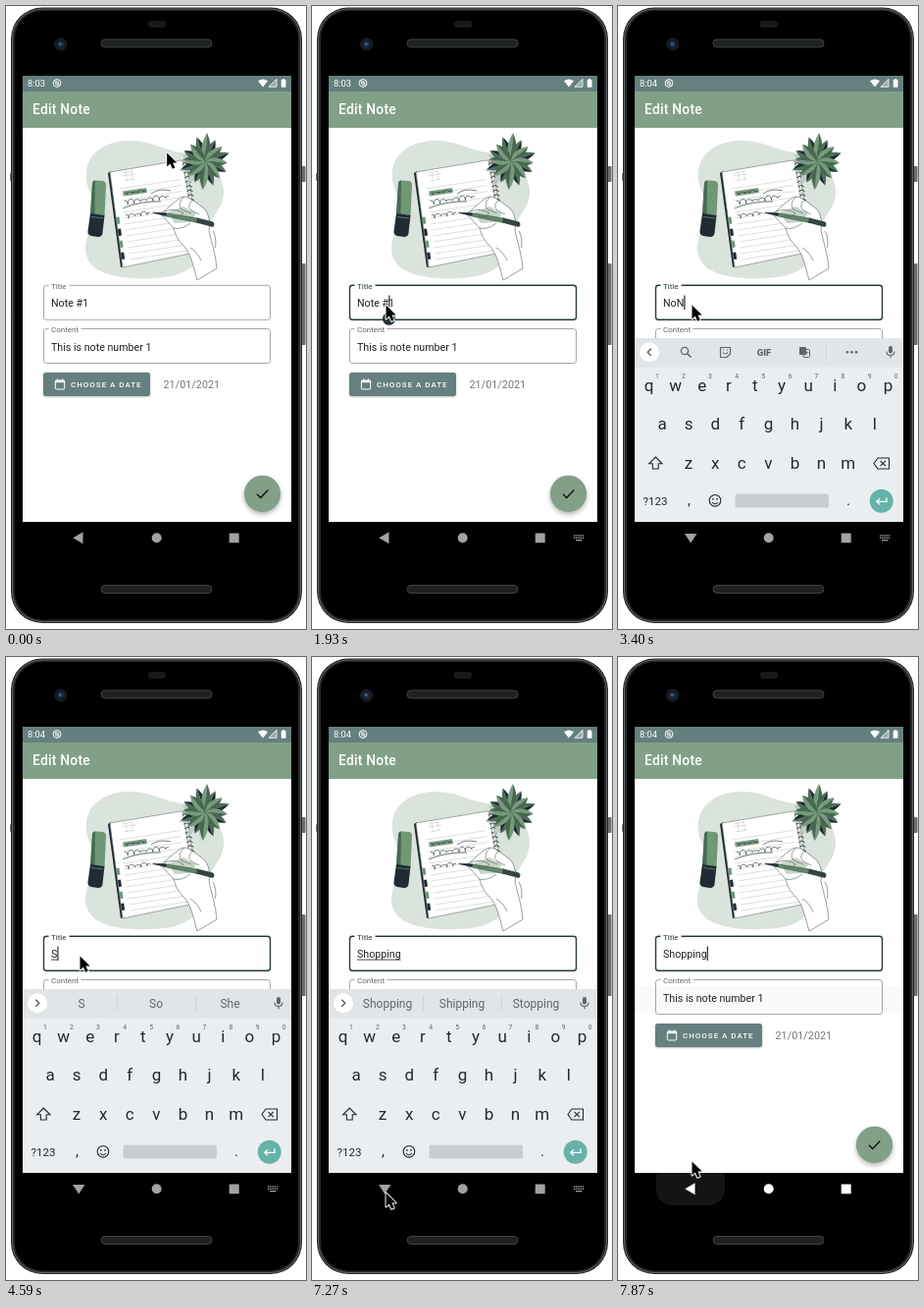
Animation, 306 px wide and 634 px high, one loop 8 s. Source, as an HTML page with a canvas:

```html
<!DOCTYPE html>
<html lang="en">
<head>
<meta charset="utf-8">
<title>Edit Note</title>
<style>
html, body { margin: 0; width: 306px; height: 634px; overflow: hidden; background: #fff; }
canvas { display: block; width: 306px; height: 634px; }
</style>
</head>
<body>
<canvas id="stage"></canvas>
<script>
const W = 306, H = 634, LOOP = 8000, TAU = Math.PI * 2;
const SAGE = '#82a087', TEAL = '#667f7f', INK = '#202c33', KEY = '#202a30', GREY = '#5f666b';
const canvas = document.getElementById('stage');
const ctx = canvas.getContext('2d');
const dpr = window.devicePixelRatio || 1;
canvas.width = W * dpr;
canvas.height = H * dpr;

// [start, value]: each value holds until the next start
const TEXT = [[0, 'Note #1'], [2960, 'Note #'], [3110, 'Note'], [3250, 'No'], [3400, 'NoN'],
  [3550, 'No'], [3700, 'N'], [4140, ''], [4590, 'S'], [4740, 'Sh'], [4890, 'Sho'],
  [5040, 'Shop'], [5340, 'Shoppi'], [5480, 'Shoppin'], [5780, 'Shopping']];
const CARET = [[0, false], [1180, true], [2230, false], [2670, true], [3840, false], [3990, true],
  [6230, false], [6680, true], [7270, false], [7720, true]];
const POINTER = [[0, [163.7, 149]], [150, [160, 163]], [300, [134, 222]], [450, [102, 288]],
  [600, [79, 316]], [740, [75, 304]], [6680, [75, 322]], [6830, [73, 410]], [6980, [68, 520]],
  [7120, [70, 578]], [7270, [75, 545]], [7720, [75, 530]], [7870, [75, 513]]];
const BOARD = [[0, 0], [2080, 0.6], [2230, 1], [7720, 0.45], [7870, 0]];
const WORDS = [[0, null], [4590, ['S', 'So', 'She']], [4740, ['Sh', 'She', 'Show']],
  [4890, ['Sho', 'Show', 'Shot']], [5040, ['Shop', 'Shops', 'Show']],
  [5340, ['Shoppi', '*Shopping', 'Shoppings']], [5480, ['Shoppin', '*Shopping', 'Shoppings']],
  [5780, ['Shopping', 'Shipping', 'Stopping']]];

function at(track, t) {
  let v = track[0][1];
  for (const [start, value] of track) if (t >= start) v = value;
  return v;
}

function rect(x, y, w, h, color) {
  ctx.fillStyle = color;
  ctx.fillRect(x, y, w, h);
}

function round(x, y, w, h, r, fill, stroke, lw = 1) {
  ctx.beginPath();
  ctx.roundRect(x, y, w, h, r);
  paint(fill, stroke, lw);
}

function disc(x, y, r, fill, stroke, lw = 1) {
  ctx.beginPath();
  ctx.arc(x, y, r, 0, TAU);
  paint(fill, stroke, lw);
}

function shape(d, fill, stroke, lw = 1) {
  const p = new Path2D(d);
  if (fill) { ctx.fillStyle = fill; ctx.fill(p); }
  if (stroke) { ctx.strokeStyle = stroke; ctx.lineWidth = lw; ctx.stroke(p); }
}

function paint(fill, stroke, lw) {
  if (fill) { ctx.fillStyle = fill; ctx.fill(); }
  if (stroke) { ctx.strokeStyle = stroke; ctx.lineWidth = lw; ctx.stroke(); }
}

function label(s, x, y, size, color, { weight = 400, align = 'left', gap = 0 } = {}) {
  ctx.font = `${weight} ${size}px Roboto, sans-serif`;
  ctx.textAlign = align;
  ctx.letterSpacing = gap + 'px';
  ctx.fillStyle = color;
  ctx.fillText(s, x, y);
  const w = ctx.measureText(s).width;
  ctx.letterSpacing = '0px';
  return w;
}

function shadow(blur, dy) {
  ctx.shadowColor = 'rgba(0,0,0,.3)';
  ctx.shadowBlur = blur * dpr;
  ctx.shadowOffsetY = dy * dpr;
}

function noShadow() {
  ctx.shadowColor = 'transparent';
}

function phone() {
  rect(0, 0, W, H, '#fff');
  round(300, 163, 5.5, 16, 1, '#6b6e70');
  round(300, 262, 5.5, 83, 1, '#6b6e70');
  round(4, 170, 2, 8, 1, '#777');
  round(5, 1.5, 297, 626.5, 32, '#252728');
  round(6.5, 3, 294, 623.5, 30.5, null, '#5d6163', 1);
  round(9, 5, 289, 619.5, 28, '#000');
  round(145, 15, 18, 7, 3, '#17191a');
  for (const y of [34, 589.5]) round(97, y, 113, 8, 4, '#1f2122', '#3f4244', 1);
  disc(55.7, 39, 6, '#15191d', '#212427');
  disc(55.7, 39, 3.3, '#1a2c48');
  disc(55.2, 38.5, 1.5, '#3d5f92');
}

function statusBar(t) {
  rect(17, 71, 274, 16, TEAL);
  label(t < 3110 ? '8:03' : '8:04', 22, 82, 9.3, '#fff');
  disc(52, 78.5, 3.9, null, '#fff', 1);
  disc(52, 78.5, 1.7, null, '#fff', 0.9);
  shape('M49.5 76L54.5 81', null, '#fff', 0.9);
  shape('M257 76.3Q262 72.5 267 76.3L262 82.5Z', '#fff');
  shape('M268 82.3L276 74.3V82.3Z', 'rgba(255,255,255,.35)', '#fff', 0.8);
  round(280.7, 75, 4.8, 7.8, 0.7, '#fff');
  rect(282, 74, 2.2, 1.5, '#fff');
}

// A pointed leaf with a light and a dark half
function leaf(angle, len, width, light, dark) {
  ctx.save();
  ctx.translate(203, 158);
  ctx.rotate(angle * Math.PI / 180);
  for (const [side, color] of [[-1, light], [1, dark]]) {
    shape(`M0 0C${len * 0.25} ${side * width} ${len * 0.6} ${side * width} ${len} 0Z`, color);
  }
  ctx.restore();
}

function plant() {
  ctx.save();
  ctx.translate(-3, 5);
  for (let i = 0; i < 4; i++) leaf(90 + i * 40, 24, 5, '#bdcabf', '#bdcabf');
  ctx.restore();
  for (let i = 0; i < 8; i++) leaf(-64 + i * 45, 24 + (i % 2) * 2, 6, '#4d7058', INK);
  for (let i = 0; i < 8; i++) leaf(-86 + i * 45, 23 + (i % 4 ? 0 : 6), 6, '#759a7d', '#47674f');
}

function scribble(x, y, w, amp, loops) {
  ctx.beginPath();
  for (let i = 0; i <= 60; i++) {
    const k = i / 60, a = k * TAU * loops;
    const px = x + k * w + Math.sin(a) * 1.6;
    const py = y - k * w * 0.13 - Math.cos(a) * amp * (0.6 + 0.4 * Math.sin(k * 11));
    i ? ctx.lineTo(px, py) : ctx.moveTo(px, py);
  }
  paint(null, INK, 0.6);
}

function notebook() {
  shape('M104 170L107 168L120 265L117 266Z', INK);
  shape('M106 169L178 157Q181 157 182 160L197 250L119 266Z', '#fff', '#6a7270', 0.6);
  shape('M180 158L184 160L199 253L196 251Z', '#dfe5e0', '#59615f', 0.5);
  for (let i = 0; i < 4; i++) {
    const x = 112.4 + i * 1.6, y = 215 + i * 12;
    shape(`M${x} ${y}l3 -.6l1 7l-3 .6Z`, i % 2 ? INK : '#6f9778');
  }
  for (let i = 0; i < 15; i++) {
    const x = 180 + i * 0.75, y = 161 + i * 4.6;
    shape(`M${x} ${y}q3 -3 6 0`, null, INK, 0.9);
  }
  for (let i = 0; i < 13; i++) {
    const x = 116 + i * 0.85, y = 186 + i * 6;
    shape(`M${x} ${y}l62 -9.5`, null, '#c5cbc7', 0.6);
  }
  shape('M118 170l11 -1.8M118 173l14 -2.2M120 178l11 -1.8M122 168l1.4 10M128 167l1.4 10', null, '#c4cbc6', 0.6);
  shape('M119 188.5L143 185L144 190L120 193.5Z', '#7f9f85');
  scribble(121, 200, 45, 2.6, 7);
  scribble(121, 191, 22, 1.2, 4);
  scribble(122, 214, 25, 2.4, 4);
  shape('M148 191q8 -6 20 -3M119 206q18 -8 39 -7', null, INK, 0.6);
}

function marker() {
  shape('M88 181Q88 177.5 92 177.5L98 178Q102 178 102 182L100.5 214L86 212Z', '#6f9778');
  shape('M88 181Q88 177.5 91 177.5L90.5 212.5L86 212Z', '#466c54');
  shape('M86 211L100.5 213L98.5 231Q98 235 94 235L87 234Q83 233 83.5 229Z', INK);
  shape('M87 214.5L99 216', null, '#55755f', 1);
}

function hand() {
  shape('M161 209C168 203 175 196 181 194C187 194 190 198 194 200L203 207C208 214 208 222 207 229C210 241 214 254 215 267L195 279C191 265 189 253 182 245C176 239 173 234 171 226C167 222 163 217 159 213Q158 210 161 209Z', '#fff', '#555e5c', 0.6);
  shape('M165 210L181 204L194 211L188 220L172 221Z', '#c7d4c9');
  shape('M150 210L165 211L196 216L195 220.5L163 214Z', '#5f8768', INK, 0.4);
  shape('M148 210.5L164 210.5L163 213.5Z', INK);
  shape('M195 215.5L211 219.5Q214 222 211 225L194 220.5Z', '#34443f');
  shape('M161 209Q174 205 181 211Q176 216 169 214M182 194Q174 201 179 207L189 211M190 198Q184 203 189 208L197 212M171 226Q179 228 188 221M188 246Q195 250 199 259', null, '#555e5c', 0.6);
  shape('M211 229Q215 235 213.5 246', null, '#9fb2a3', 1.2);
}

function artwork() {
  shape('M82 168C84 150 100 138 124 137C146 136 158 146 179 149C202 152 220 165 222 187C223 207 207 214 205 232C203 252 196 267 172 274C150 279 112 279 95 269C80 261 78 246 85 229C92 213 92 203 87 192C83 184 81 178 82 168Z', '#dae3dc');
  marker();
  notebook();
  plant();
  hand();
}

function field(y, name, w, active) {
  round(38.5, y, 231, 35, 2.7, '#fff', active ? '#263b39' : '#9c9c9c', active ? 1.4 : 0.9);
  rect(43.5, y - 2, w, 4, '#fff');
  label(name, 46, y + 3.2, 8, active ? '#263b39' : '#666');
}

function form(t) {
  const on = t >= 1180, text = at(TEXT, t);
  field(284.3, 'Title', 21, on);
  if (t >= 2230 && t < 2670) rect(78, 294, 6.3, 14.5, '#c9dcda');
  const w = label(text, 46, 306, 10.67, '#212121');
  if (t >= 4590 && t < 7720) rect(46, 307.6, w, 0.9, '#333');
  if (at(CARET, t)) rect(t < 2230 ? 78.2 : 46 + w, 294.5, 1.2, 14.5, INK);
  if (t >= 1780 && t < 2670) {
    shape('M78.5 309L84 315H73Z', '#263238');
    disc(78.5, 318.3, 6.5, '#263238');
  }
  field(328.5, 'Content', 33, false);
  label('This is note number 1', 46, 350.5, 10.67, '#212121');

  shadow(2, 0.8);
  round(38, 373, 109, 24, 2.7, TEAL);
  noShadow();
  round(50.3, 381, 9.4, 9, 1, null, '#fff', 1);
  rect(50, 381, 10, 2.2, '#fff');
  rect(52, 379.4, 1.2, 2, '#fff');
  rect(57, 379.4, 1.2, 2, '#fff');
  label('CHOOSE A DATE', 66, 388.1, 8, '#fff', { weight: 500, gap: 0.97 });
  label('21/01/2021', 160.5, 389, 10.67, '#757575', { gap: 0.1 });

  shadow(5, 2.5);
  disc(261.5, 496.3, 18.6, SAGE);
  noShadow();
  shape('M256 496.8L259.7 500.4L267.3 492.6', null, '#111', 1.4);
}

function tools() {
  disc(68, 351, 3.6, null, GREY, 1.3);
  shape('M70.7 353.7L74.5 357.5', null, GREY, 1.5);
  shape('M104.5 347.5H114.5V354L111 357.5H104.5Z', null, GREY, 1.2);
  shape('M107 352.5q2.5 3 5 0M107 350h1M111 350h1', null, GREY, 1.1);
  label('GIF', 149, 356, 9.5, GREY, { weight: 900, align: 'center' });
  round(185, 347, 7, 8, 1, GREY);
  round(189, 349.5, 6.5, 8, 1, null, GREY, 1);
  shape('M191 352.5h3.5M193 351.5q0 3 -2 4', null, GREY, 0.7);
  rect(212, 344.5, 0.8, 15.5, '#cdd2d6');
  for (const x of [234, 238.5, 243]) disc(x, 352.3, 1.3, GREY);
}

function strip(t) {
  rect(17, 338, 274, 29.5, '#e1e5e8');
  const words = at(WORDS, t), open = t >= 2530 && !words;
  disc(32, 352.3, 10, '#fff');
  shape(open ? 'M33.7 348.8L30.2 352.3L33.7 355.8' : 'M30.3 348.8L33.8 352.3L30.3 355.8', null, '#555', 1.3);
  if (open) tools();
  if (words) {
    rect(113, 344.5, 0.8, 15.5, '#c8cdd1');
    rect(193, 344.5, 0.8, 15.5, '#c8cdd1');
    words.forEach((word, i) => {
      const bold = word[0] === '*';
      label(bold ? word.slice(1) : word, [77, 153, 228.5][i], 356.7, 12, bold ? '#111' : GREY,
        { weight: bold ? 700 : 400, align: 'center' });
    });
  }
  round(276, 346, 4, 7.5, 2, GREY);
  shape('M274 351.5q0 4 4 4t4 -4M278 355.5v2.8', null, GREY, 1.1);
}

function keys() {
  const row = (letters, x, y) => [...letters].forEach((c, i) =>
    label(c, x + i * 27.1, y, 17, KEY, { align: 'center' }));
  row('qwertyuiop', 31.5, 392);
  row('asdfghjkl', 45, 431);
  row('zxcvbnm', 72, 470.5);
  [...'1234567890'].forEach((c, i) => label(c, 39.8 + i * 27.1, 378.8, 6.8, GREY, { align: 'center' }));
  shape('M38.3 459L45 465.8H41.2V471H35.4V465.8H31.6Z', null, KEY, 1.1);
  shape('M261 465.5L265 460H276.5V471H265Z', null, KEY, 1.1);
  shape('M267.5 462.8l5.4 5.4M272.9 462.8l-5.4 5.4', null, KEY, 1.1);
  label('?123', 38, 507.6, 11.5, KEY, { align: 'center' });
  label(',', 72.5, 508, 15, KEY, { align: 'center' });
  label('.', 235, 508, 15, KEY, { align: 'center' });
  disc(99, 503.3, 5.8, null, KEY, 1.1);
  disc(97, 501.8, 0.9, KEY);
  disc(101, 501.8, 0.9, KEY);
  shape('M96 505q3 3.4 6 0', null, KEY, 1.1);
  round(119.5, 496.5, 95.5, 14, 2, '#c9cdd1');
  disc(268.7, 503.7, 12, '#65b3a8');
  shape('M274 500.3V504.3H264M267 501.2L263.8 504.3L267 507.4', null, '#fff', 1.3);
}

function keyboard(t) {
  const show = at(BOARD, t);
  if (!show) return;
  ctx.save();
  ctx.globalAlpha = Math.min(1, show + 0.25);
  ctx.translate(0, (1 - show) * 150);
  rect(17, 367, 274, 159, '#ebeef1');
  strip(t);
  keys();
  ctx.restore();
}

function navBar(t) {
  const lit = t >= 7720, c = lit ? '#fff' : '#a2a2a2';
  if (t >= 7570) round(39, 525, 70, 33, [4, 4, 16, 16], '#141414');
  shape(t >= 2080 && !lit ? 'M68 537H80.5L74.2 546.5Z' : 'M68.3 541.3L78.5 535.3V547.3Z', c);
  disc(153.7, 541.3, 5, c);
  round(227.7, 536.5, 10, 9.8, 0.6, c);
  if (t >= 1930 && !lit) {
    for (let i = 0; i < 5; i++) {
      rect(267 + i * 2.2, 538.2, 1.4, 1.4, c);
      rect(267 + i * 2.2, 540.6, 1.4, 1.4, c);
    }
    rect(269, 543, 6.4, 1.3, c);
  }
}

function pointer([x, y]) {
  ctx.save();
  ctx.translate(x, y);
  ctx.lineJoin = 'round';
  const d = 'M.5 .5V14.5L3.8 11.5L6.1 16.8L8.7 15.6L6.4 10.6H10.7Z';
  shape(d, null, '#fff', 1.9);
  shape(d, '#000');
  ctx.restore();
}

function draw(t) {
  ctx.setTransform(dpr, 0, 0, dpr, 0, 0);
  phone();
  ctx.save();
  ctx.beginPath();
  ctx.rect(17, 71, 274, 454);
  ctx.clip();
  rect(17, 71, 274, 454, '#fff');
  statusBar(t);
  rect(17, 87, 274, 37, SAGE);
  label('Edit Note', 27, 110.3, 13.8, '#fff', { weight: 500, gap: 0.25 });
  artwork();
  form(t);
  if (t >= 7870) rect(17, 335, 274, 27, 'rgba(0,0,0,.02)');
  keyboard(t);
  ctx.restore();
  navBar(t);
  pointer(at(POINTER, t));
}

const begin = performance.now();
function tick() {
  draw((performance.now() - begin) % LOOP);
  requestAnimationFrame(tick);
}
tick();
</script>
</body>
</html>
```
